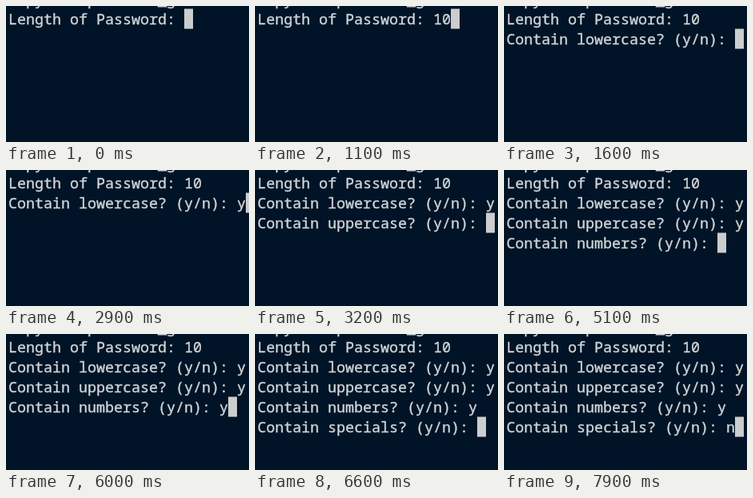
Write an HTML page with a canvas that moves like this. It is 304 px wide and 170 px high and loops after 8000 ms.

```html
<!DOCTYPE html>
<html lang="en">
<head>
<meta charset="utf-8">
<title>Password prompt</title>
<style>
  html, body { margin: 0; width: 100%; height: 100%; overflow: hidden; background: #011427; }
  canvas { display: block; }
</style>
</head>
<body>
<canvas id="stage" width="304" height="170"></canvas>
<script>
const ctx = document.getElementById('stage').getContext('2d');
const LOOP = 8000, LEFT = 3, CHAR = 11, ROW = 25;
const BACK = '#011427', TEXT = '#d0d4d6', CURSOR = '#cbcdcf';

const ask = kind => `Contain ${kind}? (y/n): `;

// Output of the session: time in ms and the text added then
const events = [
  [0, 'Length of Password: '],
  [1000, '1'],
  [1100, '0'],
  [1500, '\n'],
  [1600, ask('lowercase')],
  [2900, 'y'],
  [3200, '\n' + ask('uppercase')],
  [4400, 'y'],
  [5100, '\n' + ask('numbers')],
  [6000, 'y'],
  [6500, '\n'],
  [6600, ask('specials')],
  [7900, 'n']
];

function linesAt(time) {
  return events.filter(([at]) => at <= time).map(e => e[1]).join('').split('\n');
}

// A thin stroke gives the slightly heavier letters
function drawText(text, baseline) {
  ctx.fillText(text, LEFT, baseline);
  ctx.strokeText(text, LEFT, baseline);
}

function draw(time) {
  ctx.filter = 'none';
  ctx.fillStyle = BACK;
  ctx.fillRect(0, 0, 304, 170);

  ctx.filter = 'blur(0.35px)';
  ctx.font = '18.333px "Noto Sans Mono", "DejaVu Sans Mono", monospace';
  ctx.textBaseline = 'alphabetic';
  ctx.fillStyle = ctx.strokeStyle = TEXT;
  ctx.lineWidth = 0.4;
  ctx.lineJoin = 'round';
  drawText('> python password_g', -1);

  const lines = linesAt(time);
  lines.forEach((line, row) => drawText(line, 23 + row * ROW));

  const row = lines.length - 1;
  ctx.fillStyle = CURSOR;
  ctx.fillRect(LEFT + lines[row].length * CHAR, 3.5 + row * ROW, CHAR, ROW);
}

function tick() {
  draw(performance.now() % LOOP);
  requestAnimationFrame(tick);
}
tick();
</script>
</body>
</html>
```
